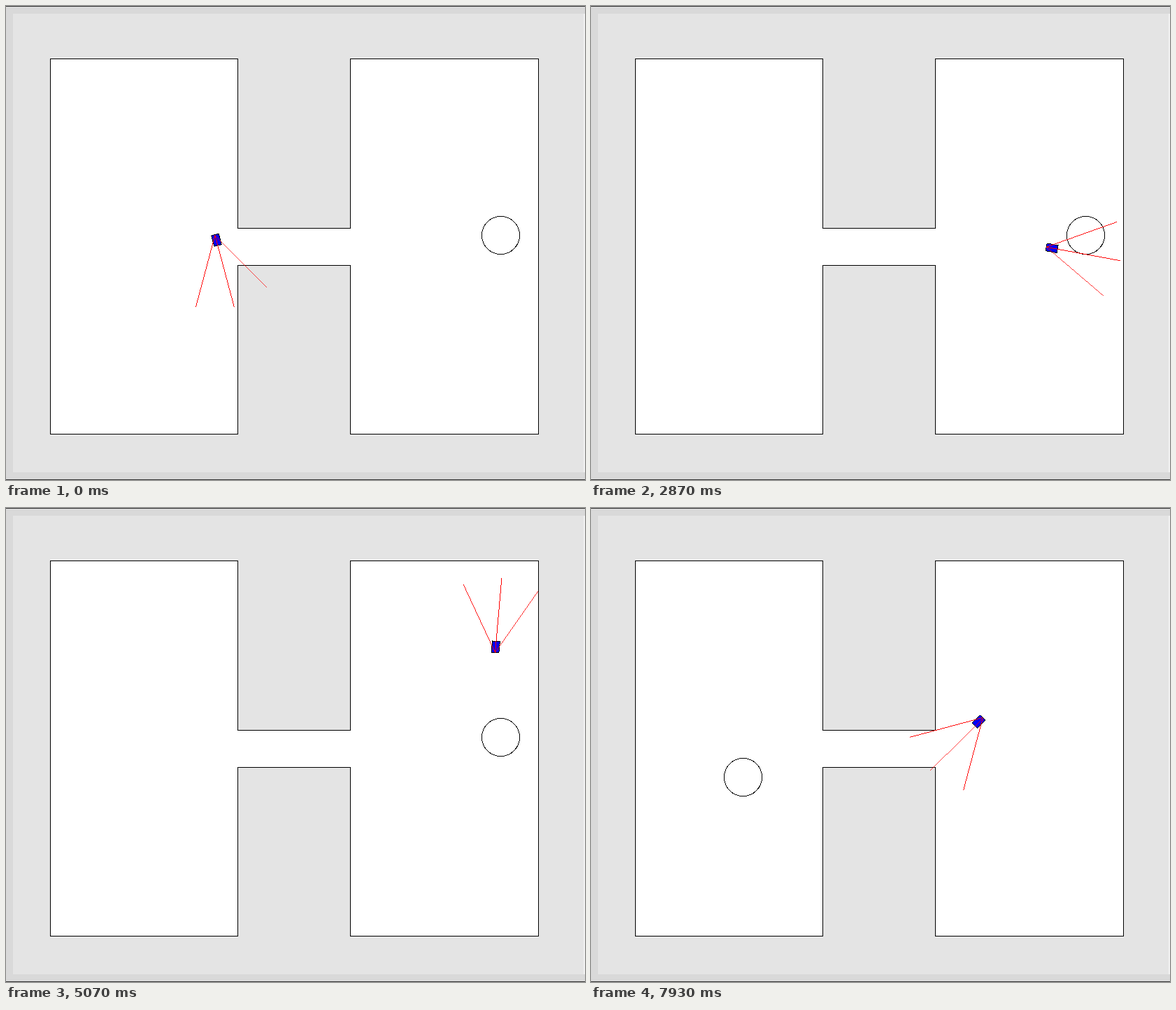
Write an HTML page that moves like this. It is 828 by 677 pixels and loops after 8 s.

```html
<!DOCTYPE html>
<html lang="en">
<head>
<meta charset="utf-8">
<title>Car with three sensors</title>
<style>
  html, body { margin: 0; width: 100%; height: 100%; overflow: hidden; background: #d9d9d9; }
  svg { display: block; }
  .scene { shape-rendering: crispEdges; stroke: #000; stroke-width: 1; }
  .ray { stroke: #f00; }
</style>
</head>
<body>
<svg width="828" height="677" viewBox="0 0 828 677">
  <rect width="828" height="677" fill="#d9d9d9"/>
  <rect x="826" y="11" width="2" height="655" fill="#f2f2f2"/>
  <path d="M0 .5H828M0 676.5H828" stroke="#333"/>
  <svg x="10" y="11" width="816" height="655" viewBox="10 11 816 655">
    <rect x="10" y="11" width="816" height="655" fill="#e4e4e4"/>
    <g class="scene" transform="translate(.5 .5)">
      <path fill="#fff" d="M63 75H331V317H492V75H761V611H492V370H331V611H63Z"/>
      <circle id="goal" r="27" fill="#fff"/>
      <rect id="car" y="-5.4" width="16.1" height="10.8" fill="#00f"/>
      <line class="ray"/><line class="ray"/><line class="ray"/>
    </g>
  </svg>
</svg>
<script>
const LOOP = 8000, STEPS = 120, RESET = 6930;
const RAY_LENGTH = 107.4, RAY_SPREAD = Math.PI / 6;

// A waypoint is passed at time t, at rear axle x and y, driving in the given direction
const waypoint = (t, x, y, degrees) => ({ t, x, y, angle: degrees * Math.PI / 180 });

const firstRun = [
  waypoint(0, 298.4, 326, 75),
  waypoint(730, 291, 513, 105),
  waypoint(870, 268, 534.5, 175),
  waypoint(1070, 242, 514, 258),
  waypoint(2000, 292, 381.5, 315),
  waypoint(2600, 558, 343, 350),
  waypoint(3000, 682, 352, 20),
  waypoint(3470, 692, 394, 150),
  waypoint(3800, 664, 393.5, 230),
  waypoint(4330, 688, 272, 290),
  waypoint(5070, 699, 206, 275),
  waypoint(6870, 758, 81, 350)
];
const secondRun = [waypoint(RESET, 744, 85, 178), waypoint(7930, 559.6, 299, 135)];

const goal = document.getElementById("goal");
const car = document.getElementById("car");
const rays = document.querySelectorAll(".ray");

function setAttributes(element, values) {
  for (const name in values) element.setAttribute(name, values[name]);
}

// Average speed on the leg that starts at waypoint i
function legSpeed(run, i) {
  const k = Math.max(0, Math.min(run.length - 2, i)), a = run[k], b = run[k + 1];
  return Math.hypot(b.x - a.x, b.y - a.y) / (b.t - a.t);
}

// Cubic Hermite path; the car always faces along its velocity
function poseAt(run, t) {
  let i = 0;
  while (i < run.length - 2 && t >= run[i + 1].t) i++;
  const a = run[i], b = run[i + 1], span = b.t - a.t;
  const u = Math.min(1, (t - a.t) / span), w = 1 - u;
  const pull = k => span * (legSpeed(run, k - 1) + legSpeed(run, k)) / 2;
  const along = (key, direction) => {
    const from = a[key], to = b[key];
    const leave = pull(i) * direction(a.angle), arrive = pull(i + 1) * direction(b.angle);
    return {
      position: from + (to - from) * u * u * (3 - 2 * u) + u * w * (w * leave - u * arrive),
      velocity: 6 * u * w * (to - from) + w * (1 - 3 * u) * leave + u * (3 * u - 2) * arrive
    };
  };
  const x = along("x", Math.cos), y = along("y", Math.sin);
  return { x: x.position, y: y.position, angle: Math.atan2(y.velocity, x.velocity) };
}

function draw(now) {
  const step = Math.floor((now % LOOP + 4) * STEPS / LOOP) % STEPS;
  const t = Math.round(step * LOOP / STEPS / 10) * 10;
  const afterReset = t >= RESET;
  const { x, y, angle } = poseAt(afterReset ? secondRun : firstRun, t);

  setAttributes(goal, afterReset ? { cx: 217, cy: 384 } : { cx: 707, cy: 327 });
  setAttributes(car, { transform: `translate(${x} ${y}) rotate(${angle * 180 / Math.PI})` });
  rays.forEach((ray, i) => {
    const cos = Math.cos(angle + (i - 1) * RAY_SPREAD);
    const sin = Math.sin(angle + (i - 1) * RAY_SPREAD);
    setAttributes(ray, {
      x1: x, y1: y, x2: x + RAY_LENGTH * cos, y2: y + RAY_LENGTH * sin,
      // keeps slanted lines one pixel thick without antialiasing
      "stroke-width": Math.max(Math.abs(cos), Math.abs(sin))
    });
  });
}

const start = performance.now();
function tick() {
  draw(performance.now() - start);
  requestAnimationFrame(tick);
}
tick();
</script>
</body>
</html>
```
